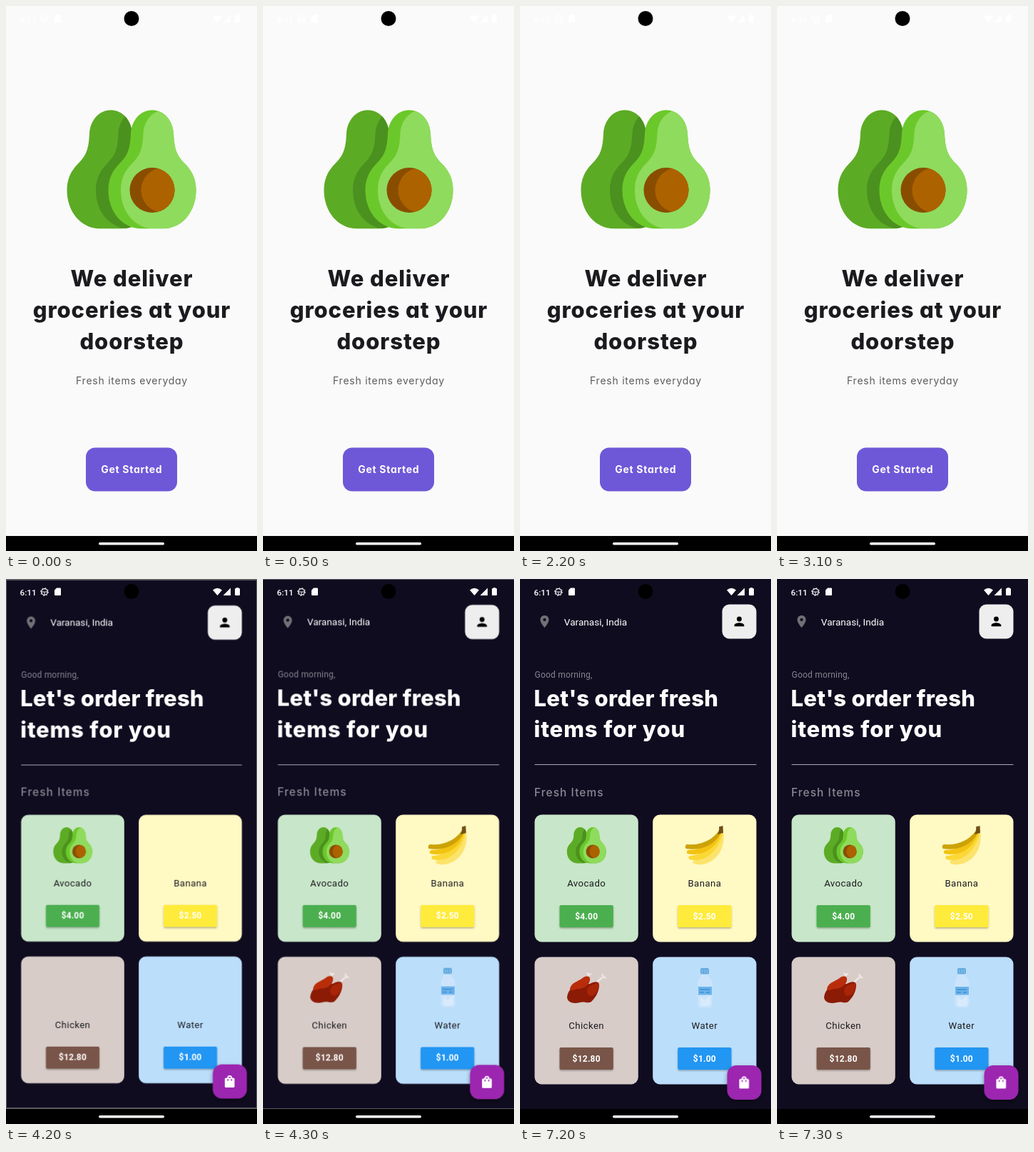
An HTML page that plays this animation: 352 px wide and 762 px high, repeating every 8 s.

```html
<!DOCTYPE html>
<html lang="en">
<head>
<meta charset="utf-8">
<title>Grocery app</title>
<style>
  html, body { margin: 0; width: 100%; height: 100%; overflow: hidden; background: #000; }
  svg { display: block; width: 100vw; height: 100vh; }
  text { white-space: pre; }
  .geo { font-family: Inter, "Open Sans", sans-serif; font-feature-settings: "cv11"; font-optical-sizing: none; }
  .rob { font-family: Roboto, Arial, sans-serif; }
  .title { font-size: 31px; font-weight: 800; letter-spacing: .9px; }
  .mid { text-anchor: middle; }
  .name { font-size: 13.2px; letter-spacing: .43px; fill: #1c1b1f; }
  .price { font-size: 12px; font-weight: 700; letter-spacing: .21px; fill: #fff; }

  #shop, .late { animation: 8s step-end infinite; }
  #shop { animation-name: open; }
  .late { animation-name: load; }
  #page { transform-box: view-box; transform-origin: 176px 381px; animation: grow 8s step-end infinite; }
  @keyframes open { 0% { opacity: 0; } 52.5%, 100% { opacity: 1; } }
  @keyframes load { 0% { opacity: 0; } 53.75%, 100% { opacity: 1; } }
  @keyframes grow {
    0%, 52.5% { transform: scale(.9955); }
    53.75% { transform: scale(.998); }
    55% { transform: scale(.9993); }
    56.25%, 100% { transform: none; }
  }
</style>
</head>
<body>
<svg viewBox="0 0 352 762">
  <defs>
    <path id="body" d="M0 0C17 0 29 15 30 33C31 56 35 64 46 75C57 86 61.5 98 61.5 112C61.5 142 42 165.8 15 165.8H-15C-42 165.8-61.5 142-61.5 112C-61.5 98-57 86-46 75C-35 64-31 56-30 33C-29 15-17 0 0 0Z"/>
    <clipPath id="inBody"><use href="#body"/></clipPath>
    <clipPath id="inPit"><circle cy="112" r="31.5"/></clipPath>
    <filter id="soft" x="-30%" y="-30%" width="160%" height="170%">
      <feDropShadow dx="0" dy="1.5" stdDeviation="1.2" flood-opacity=".3"/>
    </filter>
    <filter id="deep" x="-30%" y="-30%" width="160%" height="170%">
      <feDropShadow dx="0" dy="3" stdDeviation="3" flood-opacity=".4"/>
    </filter>

    <!-- centred on x = 0, top at y = 0 -->
    <g id="avocado">
      <g transform="translate(-29)">
        <use href="#body" fill="#5cab25"/>
        <g clip-path="url(#inBody)"><use href="#body" x="40.5" fill="#4b911f"/></g>
      </g>
      <g transform="translate(29)">
        <use href="#body" fill="#6bc82a"/>
        <g clip-path="url(#inBody)"><use href="#body" x="17.5" fill="#8fdb5d"/></g>
        <circle cy="112" r="31.5" fill="#894d00"/>
        <g clip-path="url(#inPit)"><circle cx="16" cy="112" r="31.5" fill="#ad6200"/></g>
      </g>
    </g>

    <g id="banana">
      <path d="M279 351L284.500 350C288 366 284 381 273 391C263 399 252 401 244 398Q241 396 243 394C258 388 270 372 279 351Z" fill="#fce36c"/>
      <path d="M280 353C272 373 256 386 238 387Q235 389 237.500 392C256 397 277 385 284 356Z" fill="#fbd836"/>
      <path d="M279 353C271 368 256 379 236 379Q232.500 381 234.500 384C254 388 274 379 282 356Z" fill="#f3c312"/>
      <path d="M278 353C270 364 255 373 234 371Q230.500 372.500 232.500 377C252 380 271 374 281 356Z" fill="#cda206"/>
      <path d="M279 346.500L284.500 345L285 355L277 357Q280 351 279 346.500Z" fill="#705016"/>
    </g>

    <g id="chicken">
      <path d="M92 560L97 553M94.500 551.500L97 553L99 552.500M106 565L117 556M115.500 553L117 556L119.500 557.500" stroke="#eee7e4" stroke-width="2.400" stroke-linecap="round"/>
      <path d="M66 585C67 574 76 567 86 567L98 566C105 562 111 562 111 568C111 578 105 586 100 591C96 594 90 590 84 592C76 594 67 593 66 585Z" fill="#8c1b05"/>
      <path d="M70 574C71 564 82 563 89 557C95 554 99 556 98 561C97 568 89 573 82 573C77 573 73 577 70 574Z" fill="#b92d0a"/>
      <path d="M94 576C95 567 104 567 110 564C112 571 108 580 101 583C96 583 94 580 94 576Z" fill="#a82507"/>
    </g>

    <g id="water">
      <path d="M254.500 552H263.500L265 557Q269.500 560 269.500 565V594Q269.500 599 265 599H254Q249.500 599 249.500 594V565Q249.500 560 253 557Z" fill="#cbe4fb"/>
      <path d="M253 596V584L259 589L267 582V595Q260 599 253 596Z" fill="#d8ebfc"/>
      <rect x="253" y="544" width="12" height="8.500" rx="2" fill="#65aadd"/>
      <path d="M255.500 546V551M259 546V551M262.500 546V551" stroke="#8cc5ee"/>
      <rect x="250" y="570" width="19" height="11.500" fill="#6ab3ec"/>
      <path d="M252 574H266M252 578H258M261 578H266" stroke="#428fcb" stroke-width="1.300"/>
    </g>

    <path id="pin" d="M12 2C8.130 2 5 5.130 5 9c0 5.250 7 13 7 13s7-7.750 7-13c0-3.870-3.130-7-7-7zm0 9.500a2.500 2.500 0 1 1 0-5a2.500 2.500 0 1 1 0 5z"/>
    <path id="person" d="M12 12a4 4 0 1 0 0-8a4 4 0 1 0 0 8zm0 2c-2.670 0-8 1.340-8 4v2h16v-2c0-2.660-5.330-4-8-4z"/>
    <path id="bag" d="M18 6h-2a4 4 0 0 0-8 0H6a2 2 0 0 0-2 2v12a2 2 0 0 0 2 2h12a2 2 0 0 0 2-2V8a2 2 0 0 0-2-2zm-8 4a1 1 0 0 1-2 0V8h2zm2-6a2 2 0 0 1 2 2h-4a2 2 0 0 1 2-2zm4 6a1 1 0 0 1-2 0V8h2z"/>
  </defs>

  <g id="welcome">
    <rect width="352" height="741" fill="#fafafa"/>
    <use href="#avocado" x="176" y="145.500"/>
    <g class="geo mid">
      <g class="title" fill="#1b1b1f">
        <text x="176.500" y="392">We deliver</text>
        <text x="176.500" y="436">groceries at your</text>
        <text x="176.500" y="479.500">doorstep</text>
      </g>
      <text x="176.500" y="529" font-size="14" letter-spacing=".75" fill="#5c5c5e">Fresh items everyday</text>
      <rect x="112" y="617.500" width="128" height="61" rx="13" fill="#6e58d8"/>
      <text x="176.300" y="653" font-size="14" font-weight="700" letter-spacing=".7" fill="#fff">Get Started</text>
    </g>
  </g>

  <g id="shop">
    <rect width="352" height="741" fill="#5c5b62"/>
    <g id="page">
      <rect width="352" height="741" fill="#100c20"/>
      <use href="#pin" transform="translate(24.200 49.200) scale(.856)" fill="#707075"/>
      <text class="rob" x="61.800" y="64.500" font-size="13.600" fill="#fff">Varanasi, India</text>
      <rect x="283.500" y="35.500" width="48" height="48" rx="10" fill="#eee"/>
      <use href="#person" transform="translate(297.200 49.200) scale(.856)"/>
      <text class="rob" x="20.500" y="137.500" font-size="12" letter-spacing=".21" fill="#87858f">Good morning,</text>
      <g class="geo title" fill="#fff">
        <text x="19.500" y="177.500" style="letter-spacing:.3px">Let's order fresh</text>
        <text x="19.500" y="221">items for you</text>
      </g>
      <path d="M20.500 259.500H331.500" stroke="#aaa8b1"/>
      <text class="geo" x="20" y="303.500" font-size="15.400" font-weight="500" letter-spacing="1.100" fill="#8b8993">Fresh Items</text>
      <g id="cards"></g>
      <use href="#avocado" transform="translate(93.300 347) scale(.304)"/>
      <g class="late">
        <use href="#banana"/>
        <use href="#chicken"/>
        <use href="#water"/>
      </g>
      <rect x="290.500" y="680" width="48" height="48" rx="13" fill="#9c27b0" filter="url(#deep)"/>
      <use href="#bag" transform="translate(304 693.700) scale(.856)" fill="#fff"/>
    </g>
  </g>

  <g id="status" fill="#fff">
    <text class="rob" x="19.500" y="22.500" font-size="11.700" font-weight="500">6:11</text>
    <g fill="none" stroke="#fff">
      <circle cx="54" cy="18" r="4.300" stroke-width="1.300"/>
      <circle cx="54" cy="18" r="5.500" stroke-width="1" stroke-dasharray="1.500 2.820"/>
      <path d="M50 18H58M54 18V22" stroke-width=".9"/>
    </g>
    <path d="M71 12.500H76Q77 12.500 77 13.500V22Q77 23 76 23H69Q68 23 68 22V15.500Z"/>
    <path d="M290 15.500Q296.500 10 303 15.500L296.500 23ZM315 12.500V23H304.500ZM323 13V12H326V13H327Q328 13 328 14V22Q328 23 327 23H322Q321 23 321 22V14Q321 13 322 13Z"/>
  </g>
  <circle cx="176" cy="17.500" r="10.500"/>
  <rect y="741" width="352" height="21"/>
  <rect x="130" y="750" width="92" height="3.600" rx="1.800" fill="#fff"/>
</svg>
<script>
  const items = [
    ["Avocado", "$4.00", "#c8e6c9", "#4caf50"],
    ["Banana", "$2.50", "#fff9c4", "#ffeb3b"],
    ["Chicken", "$12.80", "#d7ccc8", "#795548"],
    ["Water", "$1.00", "#bbdefb", "#2196f3"]
  ];
  const card = ([name, price, pale, strong], i) => `
    <g class="rob mid" transform="translate(${20.5 + i % 2 * 165.7} ${329.5 + (i >> 1) * 199})">
      <rect width="145.300" height="178" rx="10" fill="${pale}"/>
      <text class="name" x="72.700" y="100.500">${name}</text>
      <rect x="35" y="126.500" width="75.300" height="31" rx="2" fill="${strong}" filter="url(#soft)"/>
      <text class="price" x="72.700" y="146">${price}</text>
    </g>`;
  document.getElementById("cards").innerHTML = items.map(card).join("");
</script>
</body>
</html>
```
